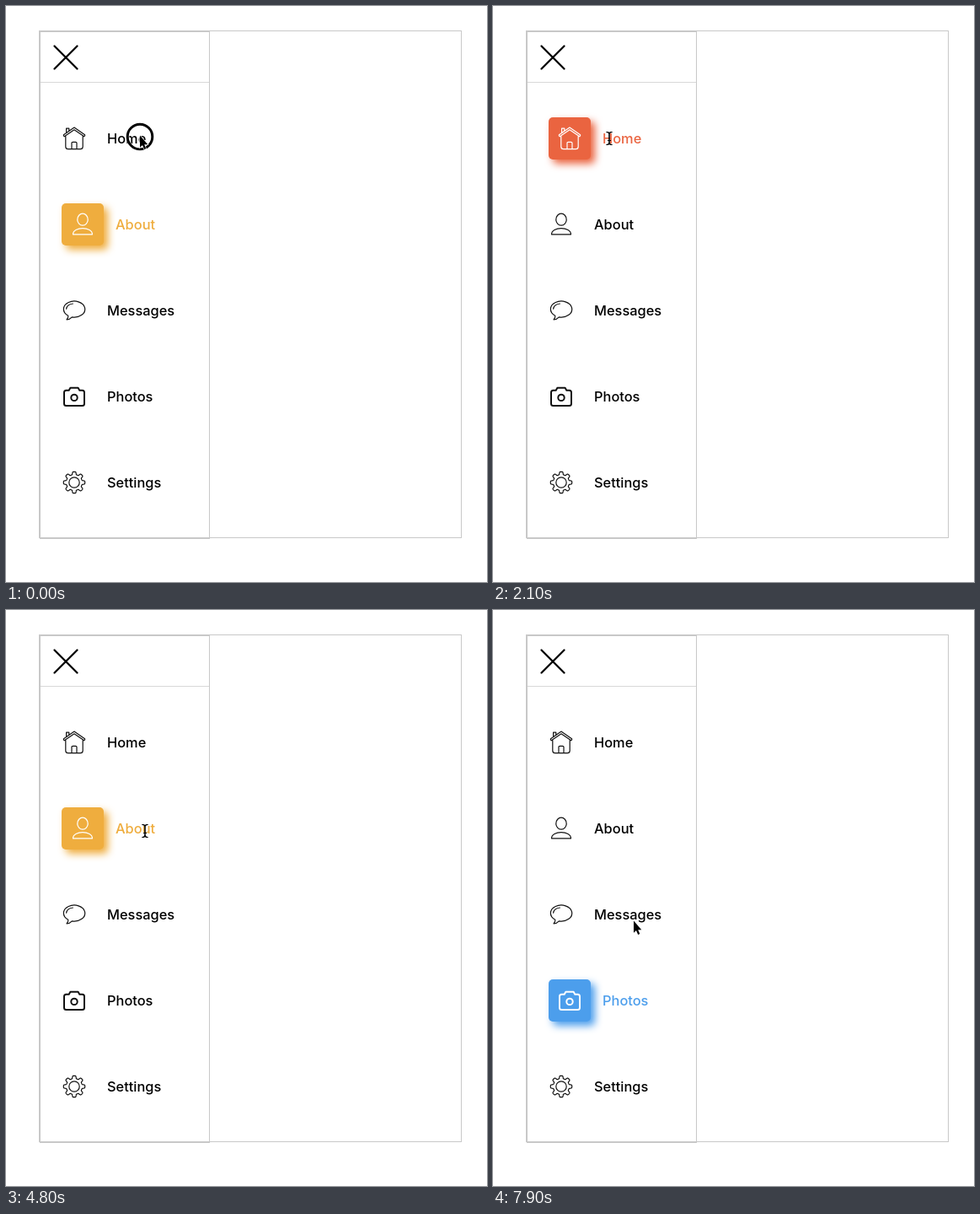
Animation, 571 px wide and 683 px high, one loop 8 s. Source, as an HTML page:

```html
<!DOCTYPE html>
<html lang="en">
<head>
<meta charset="utf-8">
<title>Sidebar menu</title>
<style>
  html, body { margin: 0; width: 100%; height: 100%; overflow: hidden; background: #fff; }
  svg { display: block; }
  text { font: 500 16.4px Inter, sans-serif; }
  .frame { fill: none; stroke: #c8c8c8; }
  .icon { fill: none; stroke: #111; stroke-width: 1.2; stroke-linejoin: round; stroke-linecap: round; }
  .tile { fill: var(--tint); filter: drop-shadow(5px 5px 5px var(--tint)); visibility: hidden; }
  .on .tile { visibility: visible; }
  .on .icon { stroke: #fff; }
  .on text { fill: var(--tint); }
  .on .move { transform: translateX(10px); }
</style>
</head>
<body>
<svg width="571" height="683" viewBox="0 0 571 683">
  <rect class="frame" x="39.5" y="29.5" width="501" height="601"/>
  <rect class="frame" x="40.5" y="30.5" width="201" height="601"/>
  <path d="M41 90.5H241" stroke="#d8d8d8"/>
  <path d="M57.5 47.5L84.5 74.5M84.5 47.5L57.5 74.5" stroke="#000" stroke-width="2.3" stroke-linecap="round"/>
  <g id="menu"></g>
  <g id="pointer">
    <g id="ring" fill="none">
      <circle stroke="#fff" stroke-opacity=".5" stroke-width="4.5"/>
      <circle stroke="#000" stroke-width="3"/>
    </g>
    <path id="arrow" d="M0 -1.5V12.8L3 10L5.2 15L7.3 14.1L5.2 9.2H9.3Z" stroke="#fff" stroke-width="1.2" paint-order="stroke"/>
    <g id="beam" fill="none" stroke-linecap="round">
      <path id="bar" d="M-3 -7.5Q0 -7.5 0 -5V5Q0 7.5 -3 7.5M3 -7.5Q0 -7.5 0 -5M0 5Q0 7.5 3 7.5M-1.5 2.5H1.5" stroke-width="1.1"/>
    </g>
  </g>
</svg>
<script>
const LOOP = 8000, STEP = 100, AFTERGLOW = 200;
const TOP = 157, PITCH = 102;
const $ = id => document.getElementById(id);

$('beam').innerHTML = '<use href="#bar" stroke="#fff" stroke-width="2"/>' + $('beam').innerHTML;
$('bar').setAttribute('stroke', '#000');

function gearPath(teeth = 8, samples = 192) {
  let d = '';
  for (let i = 0; i < samples; i++) {
    const a = i / samples * 2 * Math.PI;
    const r = 11.1 + 1.6 * Math.tanh(3 * Math.cos(teeth * a));
    d += (i ? 'L' : 'M') + (r * Math.sin(a)).toFixed(2) + ' ' + (-r * Math.cos(a)).toFixed(2);
  }
  return d + 'Z';
}

const items = [
  { name: 'Home', tint: '#ea6440', icon:
    `<path d="M-12.6 -4.2L0 -12.9L12.6 -4.2Q13 -3 11.8 -2.2L0 -10.2L-11.8 -2.2Q-13 -3 -12.6 -4.2Z
      M-9.4 -6.5V-11.8H-6.2V-8.8M-10.2 -2.8V9.7Q-10.2 12.7 -7.2 12.7H7.2Q10.2 12.7 10.2 9.7V-2.8
      M-3 12.7V5.6Q-3 4.3 -1.6 4.3H1.6Q3 4.3 3 5.6V12.7"/>` },
  { name: 'About', tint: '#efad3e', icon:
    `<ellipse cy="-5.8" rx="6.2" ry="7"/>
     <path d="M-11.5 11.8C-11.5 7 -6 4.6 0 4.6S11.5 7 11.5 11.8Z"/>` },
  { name: 'Messages', tint: '#4aad34', icon:
    `<path d="M-7.2 6.3A12.7 9.5 0 1 1 -2.6 7.8C-4.2 9.6 -6.3 10.7 -9 10.8C-7.5 9.2 -7 7.8 -7.2 6.3Z
      M-9.4 -1.8C-8.8 -5.2 -5.6 -7.6 -1.6 -8"/>` },
  { name: 'Photos', tint: '#4c9eec', icon:
    `<g stroke-width="2"><path d="M-6.3 -7.2L-4.6 -10.2H4.6L6.3 -7.2H9.5Q12 -7.2 12 -4.7V8.5Q12 11 9.5 11H-9.5
      Q-12 11 -12 8.5V-4.7Q-12 -7.2 -9.5 -7.2Z"/><circle cy="1.4" r="3.7"/></g>` },
  { name: 'Settings', tint: '#888', icon:
    `<path d="${gearPath()}"/><circle r="6.2"/>` }
];

$('menu').innerHTML = items.map(({ name, tint, icon }, i) => `
  <g transform="translate(0 ${TOP + PITCH * i})" style="--tint:${tint}">
    <rect class="tile" x="66" y="-25" width="50" height="50" rx="5"/>
    <g class="move">
      <g class="icon" transform="translate(81 0)">${icon}</g>
      <text x="120" y="6">${name}</text>
    </g>
  </g>`).join('');
const rows = [...$('menu').children];

// The row opens when the ring of its click has faded.
const clicks = [
  { row: 1, down: -100, up: 100, x: 159, y: 155 },
  { row: 0, down: 1800, up: 1900, x: 138, y: 157 },
  { row: 1, down: 4400, up: 4500, x: 163, y: 255 },
  { row: 2, down: 6100, up: 6500, x: 151, y: 365 },
  { row: 3, down: 7400, up: 7500, x: 149, y: 442 }
];
for (const c of clicks) c.end = c.up + AFTERGLOW;

// Stops between the clicks: [time, x, y]
const stops = [[1200, 152, 203], [1500, 138, 157], [2900, 173.5, 225], [3700, 165, 260],
  [4800, 165, 262], [5500, 160, 396], [7200, 147.5, 441], [7900, 167, 370]];
const path = clicks.flatMap(({ down, end, x, y }) => [[down, x, y], [end, x, y]])
  .concat(stops).sort((a, b) => a[0] - b[0]);

const ease = p => p * p * (3 - 2 * p);

function place(t) {
  const i = path.findLastIndex(k => k[0] <= t), a = path[i], b = path[i + 1] || a;
  const p = ease((t - a[0]) / (b[0] - a[0] || 1));
  return [a[1] + (b[1] - a[1]) * p, a[2] + (b[2] - a[2]) * p];
}

function overText(x, y) {
  const dy = (y - TOP + 1) % PITCH;
  return x > 120 && x < 200 && dy >= 0 && dy < 8;
}

function show(id, on) {
  $(id).style.display = on ? '' : 'none';
}

function draw(now) {
  const t = Math.floor(now % LOOP / STEP) * STEP;
  const opened = clicks.findLast(c => c.end <= t) || clicks[0];
  const click = clicks.find(c => c.down <= t && t < c.end);
  const [x, y] = place(t), beam = overText(x, y);
  rows.forEach((el, i) => el.classList.toggle('on', i === opened.row));
  $('pointer').setAttribute('transform', `translate(${x} ${y})`);
  if (click) {
    const radius = t < click.up ? 14.8 : 19.8;
    for (const c of $('ring').children) c.setAttribute('r', radius);
  }
  show('ring', click);
  show('beam', beam);
  show('arrow', !beam);
}

const start = performance.now();
function tick() {
  draw(performance.now() - start);
  requestAnimationFrame(tick);
}
tick();
</script>
</body>
</html>
```
